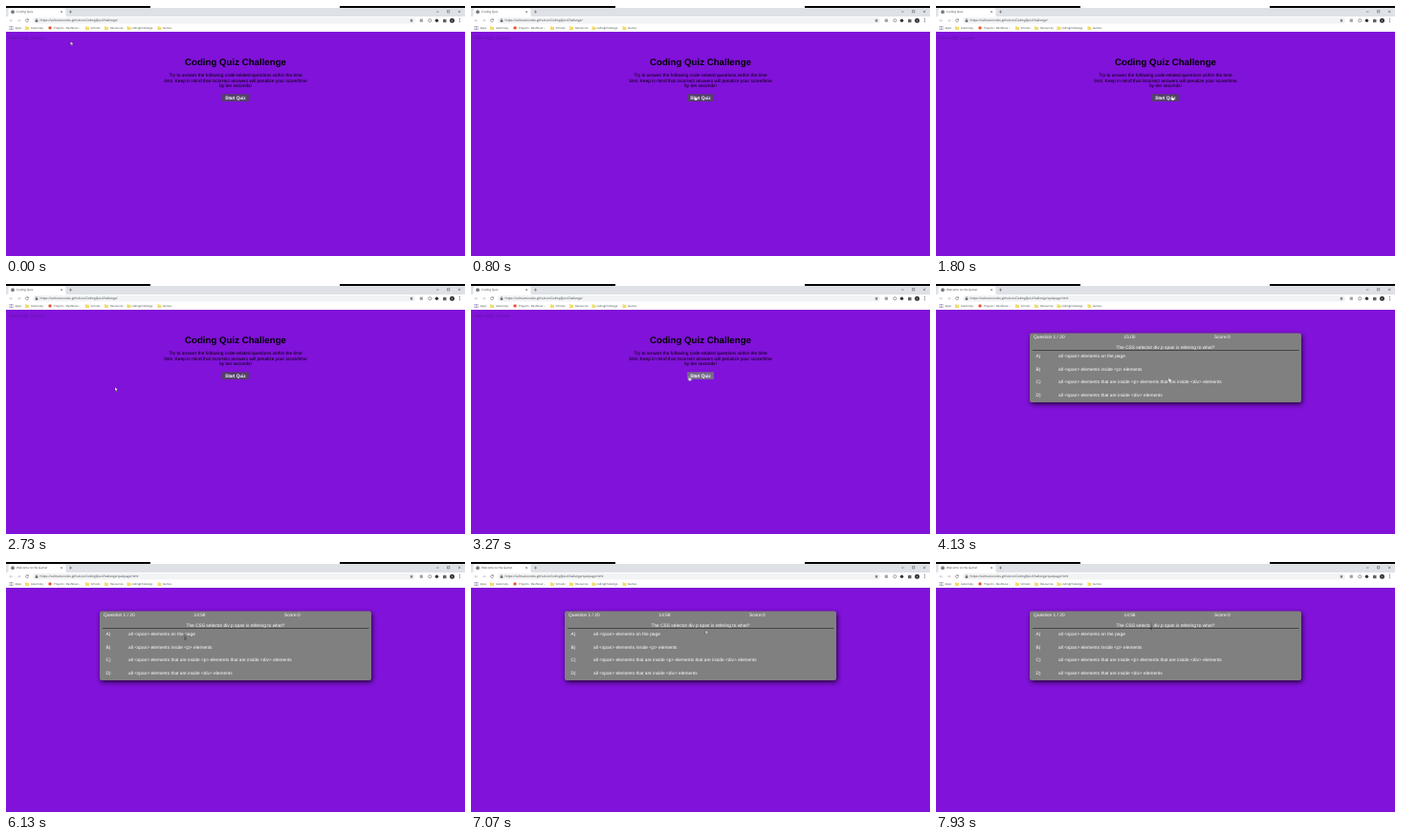
An HTML page for the animation above (8 s loop, 480 px wide and 262 px high).

```html
<!DOCTYPE html>
<html lang="en">
<head>
<meta charset="utf-8">
<title>Coding Quiz</title>
<style>
html, body { margin: 0; width: 100%; height: 100%; overflow: hidden; background: #8012d9; }
svg { display: block; width: 100vw; height: 100vh; }
text { font-family: "Liberation Sans", Arial, sans-serif; font-size: 4.82px; text-rendering: geometricPrecision; white-space: pre; }
.ui text { font-family: "Open Sans", sans-serif; font-size: 2.85px; fill: #3c4043; }
.ui .tab { font-size: 3.05px; }
.ui .url { font-size: 3.25px; }
.mid { text-anchor: middle; }
.line { fill: none; stroke: #5f6368; stroke-width: .6; }
.label { fill: #fff; stroke: #fff; stroke-width: .15; }
.card rect { filter: drop-shadow(1px 2px 2.5px #000b); }
.card text { fill: #fff; }

/* One 8 s clock drives everything */
.show { animation: 8s step-end infinite; }
.start { animation-name: start; }
.quiz { animation-name: quiz; }
.home { animation-name: home; }
.loading { animation-name: loading; }
.ready { animation-name: ready; }
.hover { animation-name: hover; }
.t0 { animation-name: t0; }
.t1 { animation-name: t1; }
.t2 { animation-name: t2; }
.arrow { animation-name: arrow; }
.hand { animation-name: hand; }
.beam { animation-name: beam; }
@keyframes start { 0% { visibility: visible } 51.625%, 100% { visibility: hidden } }
@keyframes quiz { 0% { visibility: hidden } 51.625%, 100% { visibility: visible } }
@keyframes home { 0% { visibility: visible } 49.125%, 100% { visibility: hidden } }
@keyframes loading { 0% { visibility: hidden } 49.125% { visibility: visible } 51.625%, 100% { visibility: hidden } }
@keyframes ready { 0% { visibility: visible } 49.125% { visibility: hidden } 51.625%, 100% { visibility: visible } }
@keyframes hover { 0% { visibility: hidden } 40.8% { visibility: visible } 51.625%, 100% { visibility: hidden } }
@keyframes t0 { 0% { visibility: hidden } 51.625% { visibility: visible } 76.625%, 100% { visibility: hidden } }
@keyframes t1 { 0% { visibility: hidden } 76.625% { visibility: visible } 89.125%, 100% { visibility: hidden } }
@keyframes t2 { 0% { visibility: hidden } 89.125%, 100% { visibility: visible } }
@keyframes arrow {
  0% { visibility: visible } 9.1% { visibility: hidden }
  28.375% { visibility: visible } 40.8% { visibility: hidden }
  80.8% { visibility: visible } 90%, 100% { visibility: hidden }
}
@keyframes hand {
  0% { visibility: hidden } 9.1% { visibility: visible }
  28.375% { visibility: hidden } 40.8% { visibility: visible }
  65%, 100% { visibility: hidden }
}
@keyframes beam {
  0% { visibility: hidden } 65% { visibility: visible }
  80.8% { visibility: hidden } 90%, 100% { visibility: visible }
}

/* Pointer path, sampled at about 15 steps a second */
.pointer { animation: move 8s step-end infinite; }
@keyframes move {
  0% { transform: translate(67.5px, 37px) }
  1.625% { transform: translate(67.5px, 37px); animation-timing-function: steps(3, start) }
  4.1% { transform: translate(160px, 78px); animation-timing-function: steps(3, start) }
  6.6% { transform: translate(267px, 116px); animation-timing-function: steps(4, start) }
  10% { transform: translate(233.5px, 94px) }
  15.875% { transform: translate(243px, 94px) }
  18.375% { transform: translate(236px, 94px) }
  19.2% { transform: translate(242px, 94px) }
  20% { transform: translate(248px, 94px) }
  22.5% { transform: translate(246px, 94px) }
  28.375% { transform: translate(111px, 107px) }
  34.125% { transform: translate(114px, 108px); animation-timing-function: steps(9, end) }
  41.625% { transform: translate(241.5px, 95px) }
  51.625% { transform: translate(243px, 97.5px) }
  63.375% { transform: translate(243px, 97.5px); animation-timing-function: steps(6, start) }
  68.375% { transform: translate(187.5px, 76.5px) }
  79.125% { transform: translate(187.5px, 76.5px); animation-timing-function: steps(9, start) }
  86.625% { transform: translate(257.5px, 72.5px) }
  88.375% { transform: translate(257.5px, 72.5px); animation-timing-function: steps(6, start) }
  93.4% { transform: translate(184.5px, 66px); animation-timing-function: steps(6, start) }
  98.375% { transform: translate(211px, 65.5px) }
  99.125%, 100% { transform: translate(225px, 65.5px) }
}
</style>
</head>
<body>
<svg viewBox="0 0 480 262" preserveAspectRatio="none">
  <defs>
    <path id="folder" d="M0 .3h1.5l.6.6h1.9v3.1h-4z" fill="#f3dc6e"/>
  </defs>
  <rect width="480" height="262" fill="#8012d9"/>

  <g class="ui">
    <rect width="480" height="11" fill="#dee1e6"/>
    <rect width="480" height="2" fill="#000"/>
    <rect x="151" width="198" height="2" fill="#fff"/>
    <path d="M1 11q1.500 0 1.500-1.500V4q0-1.500 1.500-1.500h57q1.500 0 1.500 1.500v5.500q0 1.500 1.500 1.500z" fill="#fff"/>
    <rect y="11" width="480" height="16" fill="#fff"/>
    <rect x="28" y="12" width="400" height="6.500" rx="3.250" fill="#f1f3f4"/>
    <circle class="show ready" cx="7" cy="6.200" r="1.900" fill="#777b80"/>
    <text class="tab show home" x="11" y="7.200">Coding Quiz</text>
    <text class="tab show loading" x="11" y="7.200">https://velmarocodes.github.io/C</text>
    <text class="tab show quiz" x="11" y="7.200">Welcome to the Game!</text>
    <g class="line">
      <path d="M57.200 5.200l1.800 1.800m0-1.800l-1.800 1.800M66 6.100h3m-1.500-1.500v3"/>
      <path d="M450 6h2.600M461.500 4.600h2.300v2.300h-2.300zM473 4.700l2.300 2.300m0-2.300l-2.300 2.300"/>
      <path d="M7 15.200h-3m1.300-1.300l-1.300 1.300 1.300 1.300M12 15.200h3m-1.300-1.300l1.300 1.300-1.300 1.300" stroke="#b5b8bc"/>
      <path class="show ready" d="M23.200 14.200a1.500 1.500 0 1 0 .3 1.500m0-2.200v1.200h-1.200"/>
      <path class="show loading" d="M21 14.200l2 2m0-2l-2 2"/>
      <path d="M31.200 15v-.6a.8.800 0 0 1 1.600 0v.6"/>
    </g>
    <rect x="30.700" y="14.900" width="2.600" height="1.900" fill="#5f6368"/>
    <text class="url show home" x="35.500" y="16.400">https://velmarocodes.github.io/CodingQuizChallenge/</text>
    <text class="url show loading" x="35.500" y="16.400">https://velmarocodes.github.io/CodingQuizChallenge/quizpage.html</text>
    <text class="url show quiz" x="35.500" y="16.400">https://velmarocodes.github.io/CodingQuizChallenge/quizpage.html</text>

    <path d="M424 13.300l.6 1.300 1.400.1-1.100.9.400 1.400-1.300-.8-1.300.8.400-1.400-1.100-.9 1.400-.1z" fill="#777b80"/>
    <rect x="432.700" y="13.600" width="3.200" height="3.200" fill="#a5a0a0"/>
    <circle class="line" cx="443.300" cy="15.200" r="1.600"/>
    <circle cx="450.500" cy="15.200" r="1.700" fill="#333"/>
    <path d="M457 14h1.100a.7.700 0 0 1 1.300 0h1.100v3.200h-3.500z" fill="#5f6368"/>
    <circle cx="466.500" cy="15.200" r="2.500" fill="#34383c"/>
    <circle cx="466.500" cy="15.200" r=".7" fill="#999"/>
    <path d="M474.500 13.500v.1m0 1.500v.1m0 1.500v.1" stroke="#5f6368" stroke-width=".9" stroke-linecap="round"/>

    <path d="M3.500 21.500h4m-4 1.500h4m-4 1.500h4" stroke="#7b70a0" stroke-width=".9" stroke-dasharray=".9 .6"/>
    <use href="#folder" x="20" y="21"/>
    <circle cx="46" cy="22.900" r="1.700" fill="#e8572c"/>
    <use href="#folder" x="83" y="21"/>
    <use href="#folder" x="103" y="21"/>
    <use href="#folder" x="126.500" y="21"/>
    <use href="#folder" x="158.500" y="21"/>
    <text x="9.500" y="23.900">Apps</text>
    <text x="26" y="23.900">Automaty</text>
    <text x="50" y="23.900">Projects · Dashboar…</text>
    <text x="88.500" y="23.900">Schools</text>
    <text x="109" y="23.900">Resources</text>
    <text x="131.500" y="23.900">codingChallenge</text>
    <text x="164" y="23.900">Games</text>
  </g>

  <g class="show start">
    <text x="2.500" y="35" fill="#6414ab">View High Scores</text>
    <text class="mid" x="240" y="61.600" style="font-size:9.680px;font-weight:bold">Coding Quiz Challenge</text>
    <g class="mid">
      <text x="240" y="74.400">Try to answer the following code-related questions within the time</text>
      <text x="240" y="79.900">limit. Keep in mind that incorrect answers will penalize your score/time</text>
      <text x="240" y="85.400">by ten seconds!</text>
    </g>
    <rect x="226" y="92.300" width="28" height="7.700" rx=".8" fill="#54426a"/>
  </g>
  <rect class="show hover" x="226" y="92.300" width="28" height="7.700" rx=".8" fill="#766a8c"/>
  <text class="mid label show start" x="240" y="97.500">Start Quiz</text>

  <g class="card show quiz">
    <rect x="98" y="51.500" width="284" height="72.500" rx="2" fill="#808080"/>
    <text x="102" y="56.700">Question 1 / 20</text>
    <text class="show t0" x="196.500" y="56.700">15:00</text>
    <text class="show t1" x="196.500" y="56.700">14:59</text>
    <text class="show t2" x="196.500" y="56.700">14:58</text>
    <text x="291" y="56.700">Score:0</text>
    <text class="mid" x="240" y="67.500">The CSS selector div p span is refering to what?</text>
    <path d="M101 69.500h278.500" stroke="#2c2c2c" stroke-width=".7"/>
    <text x="104.500" y="77.400">A)</text>
    <text x="128" y="77.400">all &lt;span&gt; elements on the page</text>
    <text x="104.500" y="90.900">B)</text>
    <text x="128" y="90.900">all &lt;span&gt; elements inside &lt;p&gt; elements</text>
    <text x="104.500" y="104.400">C)</text>
    <text x="128" y="104.400">all &lt;span&gt; elements that are inside &lt;p&gt; elements that are inside &lt;div&gt; elements</text>
    <text x="104.500" y="117.900">D)</text>
    <text x="128" y="117.900">all &lt;span&gt; elements that are inside &lt;div&gt; elements</text>
  </g>

  <g class="pointer">
    <path class="show arrow" d="M0 0v4l.9-.8.700 1.500.7-.3-.7-1.500h1.300z" fill="#fff" stroke="#000" stroke-width=".25"/>
    <path class="show hand" d="M.2.400q.5-.6.900 0v1.500l1.900.5q.5.200.3 1l-.5 1.600h-2l-1.500-1.900q.2-.6.900 0z" fill="#fff" stroke="#000" stroke-width=".25"/>
    <path class="show beam" d="M-.7 0h1.400m-.7 0v4.600m-.7 0h1.400" fill="none" stroke="#111" stroke-width=".6"/>
  </g>
</svg>
</body>
</html>
```
